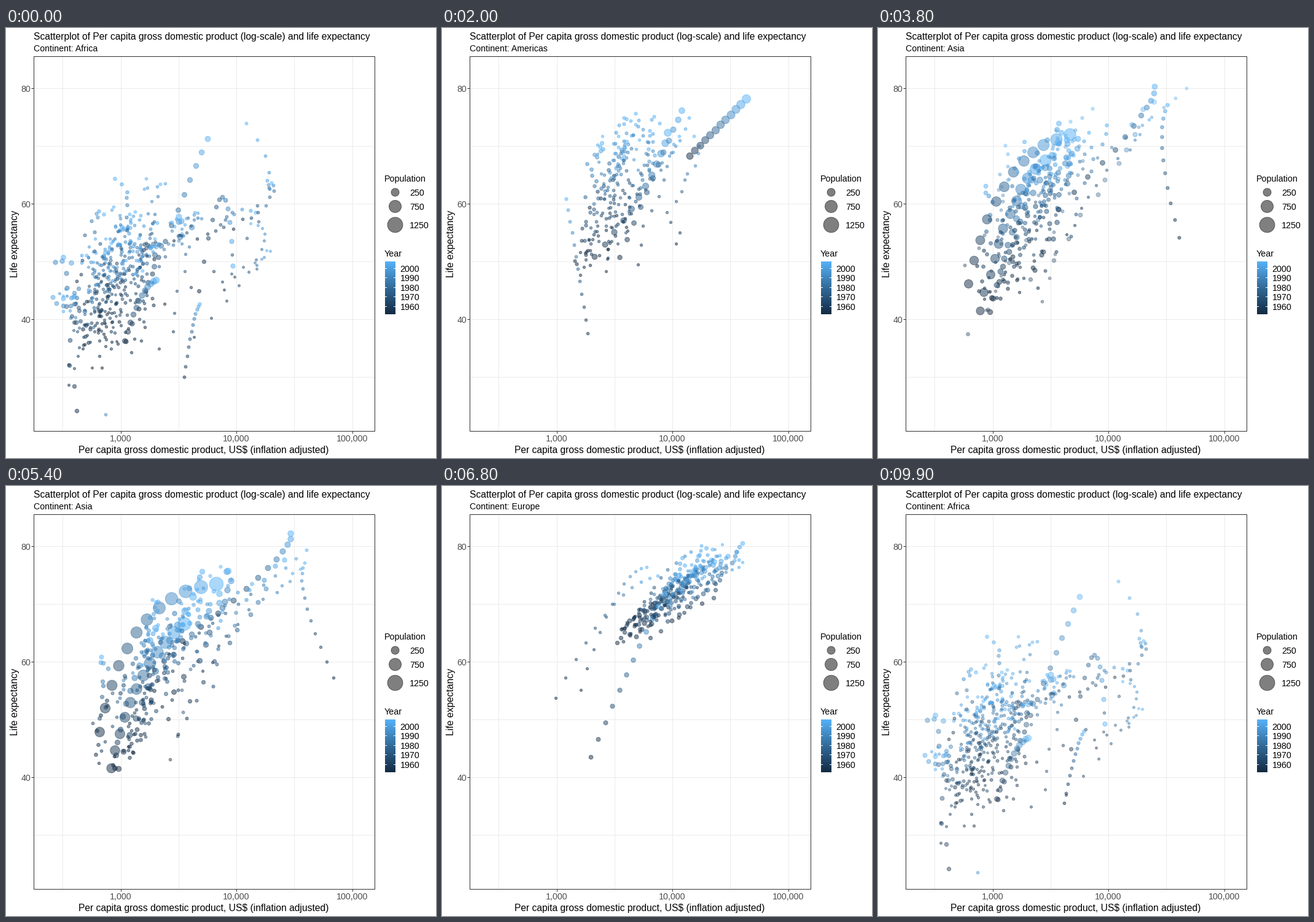
A matplotlib script that plays this animation: 700x700 px, repeating every 10 s.

```python
import numpy as np
import matplotlib.pyplot as plt
from matplotlib.animation import FuncAnimation
from matplotlib.colors import LinearSegmentedColormap
from matplotlib.patches import Rectangle

SIZE, DPI = 700, 100
PX = 72 / DPI                       # points per pixel
YEARS = 12                          # 1952 to 2007 in steps of five
T = np.linspace(0, 1, YEARS)
HOLD, CYCLE = 14, 20                # still frames, frames per continent
NAMES = ["Africa", "Americas", "Asia", "Europe", "Oceania"]

plt.rcParams["font.family"] = "Liberation Sans"
BLUES = LinearSegmentedColormap.from_list("year", ["#132B43", "#326A98", "#56B1F7"])


# ---- data: one path per country, columns log10(gdp), life, population ----

def bend(start, end, bow):
    """Run from start to end, bowed ahead of (or behind) the straight line."""
    return start + (end - start) * (T + bow * T * (1 - T))


def path(gdp0, gdp1, life0, life1, pop, gdp_bow=0, life_bow=0, pop_ratio=.42):
    return np.column_stack([bend(np.log10(gdp0), np.log10(gdp1), gdp_bow),
                            bend(life0, life1, life_bow),
                            pop * pop_ratio ** (1 - T)])


def wander(rng, step):
    """Random walk that starts and ends at zero."""
    walk = np.cumsum(rng.normal(0, step, YEARS))
    return walk - walk[0] - T * (walk[-1] - walk[0])


def continent(count, seed, standouts, floor, spread, rise, rise_sd, life0, life1,
              slope, life_sd, life_bow, pop, pop_ratio=.42, step=.03, cap=82):
    """Random countries around typical values; standouts take their own place."""
    rng = np.random.default_rng(seed)
    mean = floor + 3 * spread
    rows = []
    for i in range(count):
        g0 = floor + rng.gamma(3, spread)
        g1 = np.clip(g0 + rng.normal(rise, rise_sd), 2.5, 4.6)
        start = life0 + slope * (g0 - mean) + rng.normal(0, life_sd)
        end = life1 + slope * (g1 - mean - rise) + rng.normal(0, life_sd)
        size = pop * np.exp(rng.normal(0, .9))
        country = path(10 ** g0, 10 ** g1, start, min(end, cap - rng.exponential(1.2)),
                       size, .4, life_bow, pop_ratio)
        country[:, 0] += wander(rng, step)
        country[:, 1] += wander(rng, 12 * step)
        rows.append(standouts.get(i, country))
    return np.vstack(rows)


africa = continent(
    52, 11,
    {1: path(3520, 4797, 30, 42.7, 12, 0, .7),
     14: path(1419, 5581, 41.9, 71.3, 80, .1, .15),
     18: path(4293, 13206, 37, 56.7, 1.5, 2.6, .9),
     26: path(2387, 12057, 42.7, 74, 6, 2.8),
     36: path(1077, 2014, 36.3, 46.9, 135, 0, .8),
     43: path(4725, 9270, 45, 49.3, 44, .6, 13)},
    floor=2.5, spread=.155, rise=.1, rise_sd=.22, life0=38.8, life1=53.5,
    slope=8, life_sd=4.5, life_bow=.9, pop=7, step=.05, cap=76)
# one lone country-year far below the rest
africa[38 * YEARS + 8, :2] = np.log10(737), 23.6

americas = continent(
    25, 5,
    {2: path(2109, 9066, 50.9, 72.4, 190, .6, .1),
     12: path(1840, 1202, 37.6, 60.9, 8.5, 0, .1),
     15: path(3478, 11978, 50.8, 76.2, 109, .3, .35),
     22: path(13990, 42952, 68.4, 78.2, 301, pop_ratio=.52)},
    floor=3.1, spread=.12, rise=.33, rise_sd=.15, life0=52, life1=73,
    slope=8, life_sd=3.2, life_bow=.35, pop=8, step=.035, cap=80)

asia = continent(
    33, 8,
    {2: path(684, 1391, 37.5, 64.1, 150, -1),
     4: path(400, 4959, 44, 73, 1318, -.6, .9),
     6: path(547, 2452, 37.4, 64.7, 1110, -.6, .4),
     7: path(750, 3541, 37.5, 70.7, 223, -.2, .1),
     11: path(3217, 31656, 63, 82.6, 127, 1.1, .55, .68),
     15: path(108382, 47307, 55.6, 77.6, 2.5, 1.6, .6),
     25: path(2315, 47143, 60.4, 80, 4.5, .2, .1)},
    floor=2.5, spread=.21, rise=.52, rise_sd=.24, life0=46.5, life1=70.5,
    slope=9, life_sd=3.5, life_bow=.4, pop=18, step=.045)

europe = continent(
    30, 21,
    {0: path(1601, 5937, 55.2, 76.4, 3.6, .1, 1),
     3: path(974, 7446, 53.8, 74.9, 4.5, .1, .9),
     28: path(1969, 8458, 43.6, 71.8, 71, .1, .2)},
    floor=3.4, spread=.125, rise=.57, rise_sd=.08, life0=66.8, life1=77.8,
    slope=9, life_sd=1.4, life_bow=.15, pop=10, pop_ratio=.78, step=.025, cap=82.5)

oceania = np.vstack([path(10040, 34435, 69.1, 81.2, 20.4, .1, -.35),
                     path(10557, 25185, 69.4, 80.2, 4.1, .2, -.6)])


def diameter(pop):
    return 3.4 + 22 * np.sqrt(np.asarray(pop) / 1318)


def to_pixels(data):
    gdp, life, pop = data.T
    return np.column_stack([187 + 188.5 * (gdp - 3), 98.5 + 9.4 * (80 - life), diameter(pop)])


STATES = [to_pixels(data) for data in (africa, americas, asia, europe, oceania)]


# ---- fixed parts of the chart ----

fig = plt.figure(figsize=(SIZE / DPI, SIZE / DPI), dpi=DPI, facecolor="white")
ax = fig.add_axes([0, 0, 1, 1])
ax.axis("off")


def text(x, y, label, size=14.2, color="black", **kw):
    return ax.text(x, y, label, fontsize=size * PX, color=color, **kw)


def line(x0, y0, x1, y1, color, z=1):
    ax.plot([x0 + .5, x1 + .5], [y0 + .5, y1 + .5], color=color, lw=PX, zorder=z,
            solid_capstyle="butt", snap=False)


LEFT, TOP, RIGHT, BOTTOM = 45, 46, 600, 656
for i in range(6):
    x, y = int(92.75 + 94.25 * i), 98 + 94 * i
    line(x, TOP, x, BOTTOM, "#EBEBEB")
    line(LEFT, y, RIGHT, y, "#EBEBEB")
for x, label in ((187, "1,000"), (375, "10,000"), (564, "100,000")):
    line(x, BOTTOM, x, BOTTOM + 4, "#333333")
    text(x, 673, label, color="#4D4D4D", ha="center")
for y, label in ((98, "80"), (286, "60"), (474, "40")):
    line(LEFT - 4, y, LEFT, y, "#333333")
    text(40, y + 6, label, color="#4D4D4D", ha="right")
ax.add_patch(Rectangle((LEFT + .5, TOP + .5), RIGHT - LEFT, BOTTOM - TOP,
                       fill=False, ec="#333333", lw=PX, zorder=5, snap=False))

text(45, 19, "Scatterplot of Per capita gross domestic product (log-scale) and life expectancy", 15.65)
subtitle = text(45, 38, "", 14.1)
text(322, 692, "Per capita gross domestic product, US$ (inflation adjusted)", 15.65, ha="center")
text(14.5, 351.5, "Life expectancy", 15.8, rotation=90, ha="center", va="center")

text(616, 250, "Population")
for pop, y in ((250, 267), (750, 290), (1250, 320)):
    ax.scatter(633, y, s=(diameter(pop) * PX) ** 2, fc=(0, 0, 0, .5),
               ec=(0, 0, 0, .5), lw=PX)
    text(657, y + 6, pop)

text(616, 372, "Year")
ax.imshow(BLUES(np.linspace(1, 0, 86))[:, None, :3], extent=(617, 634, 466, 380),
          aspect="auto", interpolation="nearest")
for year in range(1960, 2001, 10):
    y = round(465 - (year - 1952) * 85 / 55)
    line(616.5, y, 619.5, y, "white", 3)
    line(630.5, y, 633.5, y, "white", 3)
    text(641.5, y + 6, year)

ax.set_xlim(0, SIZE)
ax.set_ylim(SIZE, 0)


# ---- motion ----

dots = ax.scatter([], [], lw=PX, zorder=3)


def update(frame):
    state, step = divmod(frame, CYCLE)
    after = (state + 1) % len(STATES)
    u = max(0, step - HOLD + 1) / (CYCLE - HOLD + 1)
    a, b = STATES[state], STATES[after]
    n = min(len(a), len(b))
    # shared rows slide; surplus rows fade in or out where they stand
    rows = a[:n] + (b[:n] - a[:n]) * u
    alpha = np.full(n, .5)
    for extra, strength in ((a[n:], 1 - u), (b[n:], u)):
        if strength > 0:
            rows = np.vstack([rows, extra])
            alpha = np.append(alpha, np.full(len(extra), .5 * strength))
    colors = BLUES(T[np.arange(len(rows)) % YEARS])
    colors[:, 3] = alpha
    dots.set_offsets(np.round(rows[:, :2]) + .5)
    dots.set_sizes((rows[:, 2] * PX) ** 2)
    dots.set_facecolor(colors)
    dots.set_edgecolor(colors)
    subtitle.set_text("Continent: " + NAMES[after if u > .5 else state])
    return dots, subtitle


anim = FuncAnimation(fig, update, frames=CYCLE * len(STATES), interval=100,
                     init_func=lambda: update(0), repeat=True, repeat_delay=0)
plt.show()
```
